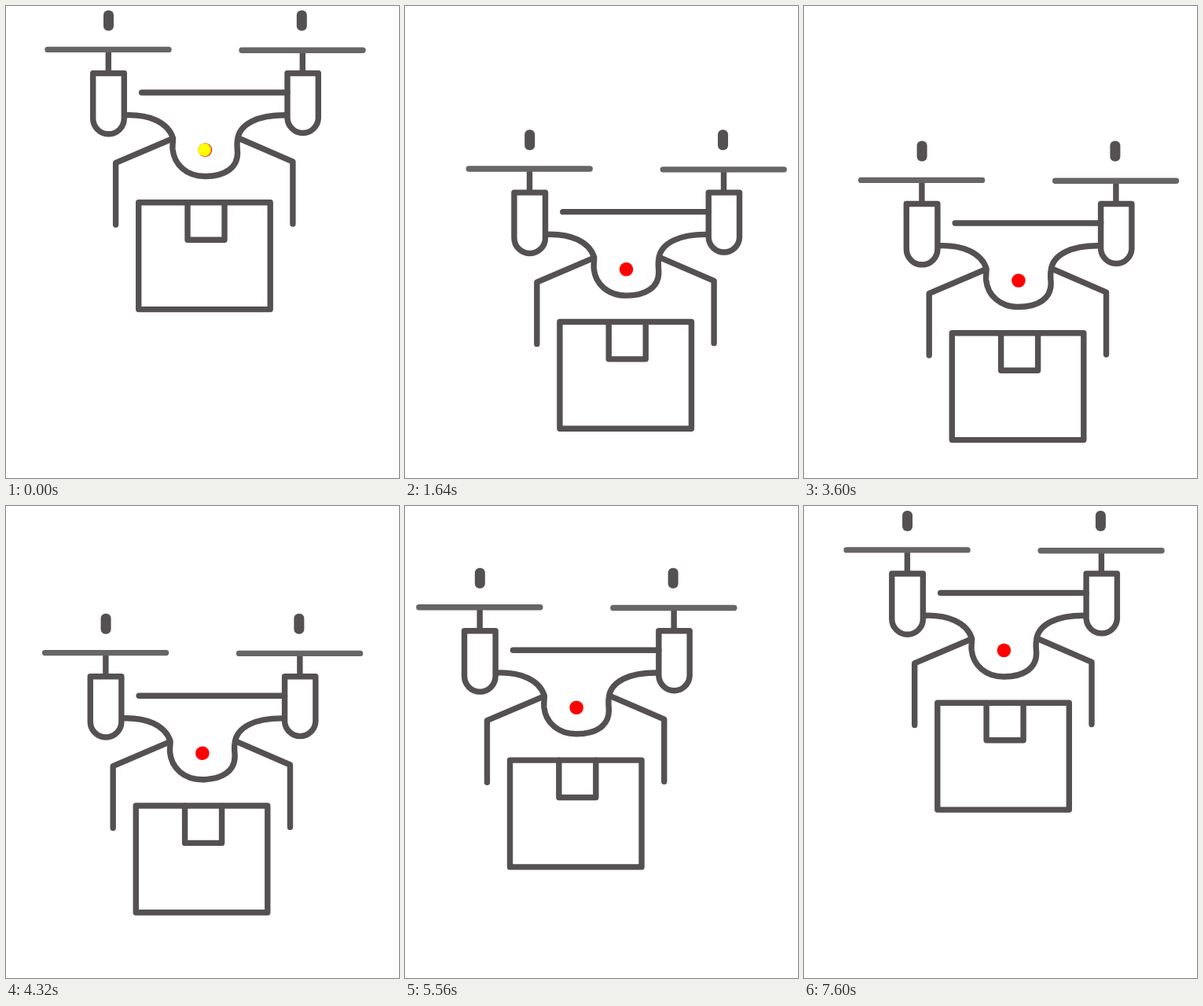
These frames come from a looping animation (500 by 600 pixels, 7680 ms). An HTML page:

```html
<!DOCTYPE html>
<html lang="en">
<head>
<meta charset="utf-8">
<title>Delivery drone</title>
<style>
  html, body { margin: 0; width: 100%; height: 100%; overflow: hidden; background: #fff; }
  svg { display: block; width: 500px; height: 600px; }
  .line { fill: none; stroke: #555051; stroke-width: 7.4; stroke-linecap: round; stroke-linejoin: round; }
  .blade { stroke: #676566; }
</style>
</head>
<body>
<svg viewBox="0 0 500 600">
  <g id="drone">
    <g fill="#555051">
      <rect x="124" y="5.5" width="13" height="26" rx="6"/>
      <rect x="369.8" y="5.5" width="13" height="26" rx="6"/>
    </g>
    <g class="line">
      <path d="M130.3 60V84M377.3 60V84"/>
      <path class="blade" d="M53 55.4H207M300 56.2H454"/>
      <path d="M110.7 85.5H150.3V143a19.8 19.8 0 0 1-39.6 0Z"/>
      <path d="M358 85.5H397.3V143a19.7 19.8 0 0 1-39.3 0Z"/>
      <path d="M172.6 110H358"/>
      <path d="M152 138.7C181 137.5 206 147 212.5 168C212.5 173 211.7 176 212 182
               C214 202 230 216.5 253 216.5C278 216.5 295.5 206 294.5 185
               C294.3 181 293.5 177 294.5 170C297 149 322 138.3 356 138.7"/>
      <path d="M211 169L139.6 199.4V278M297 168.5L364.9 197.8V277"/>
      <path d="M168.7 249.8H336.2V385.6H168.7Z"/>
      <path d="M231 250V297.2H278V250"/>
    </g>
    <circle cx="253.3" cy="183" r="8.8" fill="#f00"/>
    <circle id="flash" cx="252.7" cy="182.8" r="8.3" fill="#ff0"/>
  </g>
</svg>
<script>
const LOOP = 7680, STEP = 40;
const drone = document.getElementById('drone');
const flash = document.getElementById('flash');

// Waypoints: time, x, y
const route = [
  [0, 0, 0], [356, 0, 0], [1962, 35.3, 189.7], [3110, 35.3, 189.7],
  [5400, -38, 79], [7600, 1.1, 0.5], [LOOP, 1.1, 0.5]
];

function position(t) {
  const i = route.findIndex(p => p[0] > t);
  const [t0, x0, y0] = route[i - 1], [t1, x1, y1] = route[i];
  const k = (t - t0) / (t1 - t0);
  return [x0 + (x1 - x0) * k, y0 + (y1 - y0) * k];
}

// The lamp flashes yellow only while the drone hovers
function isYellow(t) {
  const blink = start => (t - start) % 240 < 160;
  if (t < 320) return blink(-80);
  return t >= 2040 && t < 3120 && blink(2040);
}

function draw(now) {
  const t = Math.floor(now % LOOP / STEP) * STEP;
  const [x, y] = position(t);
  drone.setAttribute('transform', `translate(${x.toFixed(2)} ${y.toFixed(2)})`);
  flash.setAttribute('visibility', isYellow(t) ? 'visible' : 'hidden');
  requestAnimationFrame(() => draw(performance.now()));
}
draw(performance.now());
</script>
</body>
</html>
```
